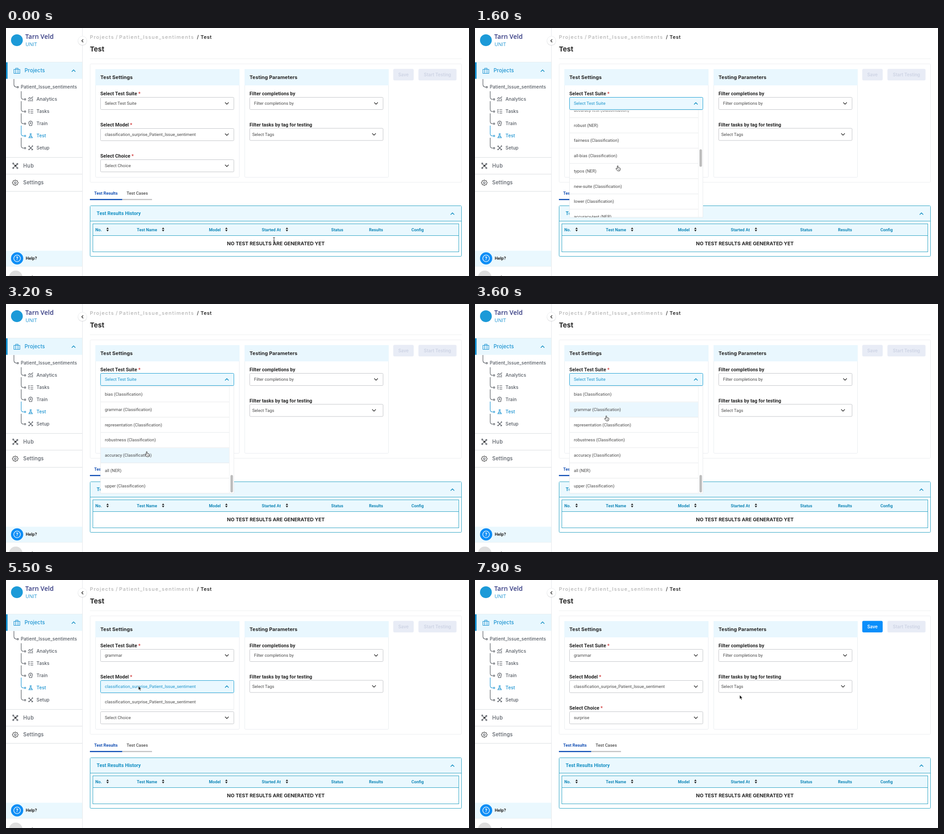
An HTML page for the animation above (8000 ms loop, 1021 px wide and 549 px high).

```html
<!DOCTYPE html>
<html lang="en">
<head>
<meta charset="utf-8">
<title>Test settings</title>
<style>
html, body { margin: 0; width: 100%; height: 100%; overflow: hidden; background: #fff; }
svg { display: block; width: 1021px; height: 549px; }
text { font-family: Roboto, sans-serif; font-size: 9.43px; fill: #4a4a4a; white-space: pre; }
.geo { font-family: Inter, sans-serif; font-weight: 500; fill: #555b63; }
.crumb { font-size: 11px; letter-spacing: 1.35px; fill: #b4b4b4; }
.nav { font-size: 11.1px; letter-spacing: .22px; }
.sub { font-size: 10.1px; letter-spacing: .08px; }
.head { font-size: 11px; font-weight: 700; letter-spacing: .08px; fill: #262626; }
.btn { font-size: 9.7px; font-weight: 600; text-anchor: middle; fill: #cdd3e4; }
.label { font-size: 10.7px; font-weight: 700; fill: #262626; }
.th { font-size: 9.2px; font-weight: 700; fill: #1488b8; }
.brand { font-family: "Open Sans", sans-serif; font-size: 14px; font-weight: 600; fill: #343a82; }
.line { fill: none; stroke: #4a4f57; stroke-width: 1.1; }
.blue { fill: #1490d0; }
.line.blue { fill: none; stroke: #1490d0; }
.chev { fill: none; stroke: #3c3c3c; stroke-width: 1.6; stroke-linecap: round; stroke-linejoin: round; }
.field rect { fill: #fff; stroke: #c3c5c9; }
.field.open rect { fill: #eaf8ff; stroke: #1d9fd2; }
.field.open text { fill: #1a94cc; }
.field.open .chev, .chev.blue { fill: none; stroke: #1490c4; }
.panel { fill: #fff; stroke: #e9ebed; }
.hover { fill: #eaf7fe; }
</style>
</head>
<body>
<svg id="stage" viewBox="0 0 1021 549"></svg>
<script>
const LOOP = 8000, STEP = 100, ROW = 33.75, TOP = 184;
const stage = document.getElementById('stage');

const text = (x, y, s, cls = '', extra = '') => `<text x="${x}" y="${y}" class="${cls}" ${extra}>${s}</text>`;
const rect = (x, y, w, h, fill, extra = '') =>
  `<rect x="${x}" y="${y}" width="${w}" height="${h}" fill="${fill}" ${extra}/>`;
const path = (d, cls = 'line', extra = '') => `<path d="${d}" class="${cls}" ${extra}/>`;
const rule = (x1, x2, y, color) => `<path d="M${x1} ${y}H${x2}" stroke="${color}"/>`;
const circle = (x, y, r, extra) => `<circle cx="${x}" cy="${y}" r="${r}" ${extra}/>`;
const chevron = (x, y, up) => `M${x - 3.5} ${y + (up ? 1.8 : -1.8)}l3.5 ${up ? -3.6 : 3.6} 3.5 ${up ? 3.6 : -3.6}`;
const label = (x, y, s, star) =>
  text(x, y, s + (star ? ' <tspan fill="#d23a3a">*</tspan>' : ''), 'label');
const field = (id, x, y, s, tx = x + 10, cx = x + 279) =>
  `<g class="field" id="${id}">` + rect(x + .5, y + .5, 294, 27, '', 'rx="2"') +
  text(tx, y + 17.2, s) + path(chevron(cx, y + 14), 'chev') + '</g>';

function sidebar() {
  const items = ['Analytics', 'Tasks', 'Train', 'Test', 'Setup'];
  const icons = [
    'M49.5 162.5V159M52.5 162.5V157M55.5 162.5V158.5M58.5 162.5V156M49 156.500l3-2.500 3 2 4.500-4',
    'M49 181l1.200 1.200 2-2.200M54 181H60M49 185l1.200 1.200 2-2.200M54 185H60M50 188.500h2M54 188.500H60',
    'M51.500 216V213.500A4.200 4.200 0 1 1 57 213.500V216ZM54.300 208.500v4M52.500 210.500h3.600',
    'M52.500 234h4M53.300 234v4l-3 5h8l-3-5v-4M51.600 240.800h5.500',
    'M50 261l9 9M59 261l-9 9M49.500 262.500l2.500-2M56.500 270.500l3-2.500M57.500 260l2 2M49.500 268l2 2'];
  let s = circle(24, 27, 13, 'fill="#1c9ad8"') +
    text(42.5, 24.3, 'Tarn Veld', 'brand') +
    text(43, 40, 'UNIT', 'brand', 'style="font-size:11px;font-weight:400;fill:#1c94d2"') +
    rule(0, 168, 75.5, '#e6edf1') +
    rect(0, 76, 168, 36.5, '#e8f7fe') + rect(0, 76, 3.5, 36.5, '#1490d0') +
    path('M17.5 91.500h13v9h-13zM21.500 100.500v-11.500h5v11.500', 'line blue') +
    text(41, 98.2, 'Projects', 'geo nav', 'style="fill:#1490d0"') +
    path(chevron(149, 94.5, true), 'chev blue') +
    path('M17.500 113V125Q17.500 130.500 24 131') + circle(26, 131, 1.6, 'class="line"') +
    text(32.5, 134.4, 'Patient_Issue_sentiments', 'geo sub');
  items.forEach((name, i) => {
    const y = 158 + 27 * i, on = name === 'Test' ? ' blue' : '';
    s += path(`M33.500 ${y - (i ? 23 : 18)}V${y - 5}Q33.500 ${y} 39.500 ${y}`, 'line' + on) +
      circle(42, y, 1.6, `class="line${on}"`) + path(icons[i], 'line' + on) +
      text(67.3, y + 3.4, name, 'geo sub', on && 'style="fill:#1490d0"');
  });
  for (const y of [286.5, 323.5, 361.5]) s += rule(0, 168, y, '#dadde0');
  s += path('M20.500 305l-4-4.500M20.500 305l4.500-4M20.500 305l-4.500 5M20.500 305l4 4.500M20.500 305h4');
  for (const [x, y] of [[16, 300], [25, 301], [16, 310], [25, 310]]) s += circle(x, y, 1.4, 'fill="#fff" class="line"');
  s += circle(20.5, 305, 2, 'fill="#333"') + text(38, 308.8, 'Hub', 'geo nav', 'style="letter-spacing:.6px"') +
    path('M20.500 336.500l2 1.500 2.500 0 .5 2.500 1.500 2-1.500 2-.5 2.500-2.500 0-2 1.500-2-1.500-2.500 0-.5-2.500-1.500-2 1.500-2 .5-2.500 2.500 0z', 'line', 'style="stroke:#333"') +
    circle(20.5, 342.5, 2, 'class="line"') + text(38, 346.3, 'Settings', 'geo nav') +
    rect(0, 493, 168, 34.5, '#eaf8fe') + rule(0, 168, 527.5, '#e6eff4') +
    circle(24.5, 510, 13.5, 'fill="#0d8ef6"') + circle(24.5, 510, 7.3, 'fill="none" stroke="#fff" stroke-width="1.3"') +
    text(24.5, 513.5, '?', '', 'text-anchor="middle" style="fill:#fff;font-weight:700;font-size:10px"') +
    text(43.5, 513.4, 'Help?', 'label', 'style="font-size:9.6px"') +
    circle(21.5, 552, 15, 'fill="#dedede"') + rect(57, 548, 2, 1, '#777') +
    path('M168.500 0V549', '', 'stroke="#e4e7ea"') +
    circle(168.5, 29, 10.2, 'fill="#000" opacity=".1"') + circle(168.5, 28, 9.8, 'fill="#fff" stroke="#e8eaec" stroke-width=".8"') +
    path('M169.800 25.500l-2.800 2.800 2.800 2.800', 'chev', 'stroke-width="1.2"');
  return s;
}

function card(x, title) {
  return rect(x + .5, 91.5, 317, 239, '#fff', 'rx="2" stroke="#e9edf0"') +
    rect(x, 91, 318, 36, '#e9f7fe') + text(x + 11, 112.7, title, 'geo head');
}

function main() {
  let s = text(185, 24, 'Projects', 'geo crumb') + text(242, 24, '/', 'geo crumb') +
    text(249.5, 24, 'Patient_Issue_sentiments', 'geo crumb') +
    text(421, 24, '/', 'geo crumb', 'style="fill:#262626"') +
    text(429, 24, 'Test', 'geo crumb', 'style="fill:#262626;font-weight:600;letter-spacing:.5px"') +
    text(185, 52, 'Test', 'geo head', 'style="font-size:15px;letter-spacing:0"') +
    rule(185, 1005, 68, '#eceeef') +
    rect(185.5, 79.5, 819, 262, '#fff', 'rx="2" stroke="#eceef0"') +
    card(197, 'Test Settings') + card(526, 'Testing Parameters') +
    label(208, 148.7, 'Select Test Suite', true) + label(208, 218, 'Select Model', true) +
    label(208, 287.4, 'Select Choice', true) +
    label(537, 148.7, 'Filter completions by') + label(537, 218, 'Filter tasks by tag for testing') +
    field('suite', 208, 153, 'Select Test Suite') +
    field('model', 208, 222, 'classification_surprise_Patient_Issue_sentiment') +
    field('choice', 208, 291, 'Select Choice') +
    field('filter', 537, 153, 'Filter completions by') +
    field('tags', 537, 221.5, 'Select Tags', 543, 811.5) +
    rect(854, 90.5, 45, 25.5, '#e8ecf6', 'rx="3" id="saveBox"') + text(876.5, 106.7, 'Save', 'geo btn', 'id="saveText"') +
    rect(909.5, 90.5, 84, 25.5, '#e8ecf6', 'rx="3"') + text(951.5, 106.7, 'Start Testing', 'geo btn') +
    text(194.5, 369, 'Test Results', '', 'style="fill:#1450b4;font-weight:700;font-size:9.25px"') +
    text(266, 369, 'Test Cases', '', 'style="font-weight:500"') +
    rect(185, 378.5, 71.5, 2.5, '#0d4cb4') + rect(256.5, 378.5, 65.5, 2.5, '#c2c2c4') +
    rect(185.5, 393.5, 819, 112, '#fff', 'rx="2" stroke="#2ba3c4"') +
    rect(186, 394, 818, 33.5, '#eaf8fe') + rule(186, 1004, 427.5, '#2ba3c4') +
    text(200, 414, 'Test Results History', 'label', 'style="fill:#1490c4"') + path(chevron(984.5, 411, true), 'chev blue') +
    rect(191.5, 433.5, 807, 62, '#fff', 'stroke="#2ba3c4"') +
    rect(192, 434, 806, 25.5, '#eaf8fe') + rule(192, 998, 459.5, '#2ba3c4') +
    text(595, 481.3, 'NO TEST RESULTS ARE GENERATED YET', 'geo head', 'text-anchor="middle" style="font-size:10.9px;letter-spacing:0"');
  const cols = [[197, 'No.', 224], [288.5, 'Test Name', 346.5], [447.5, 'Model', 486], [564, 'Started At', 619.5],
    [717, 'Status'], [800.5, 'Results'], [894, 'Config']];
  for (const [x, name, sort] of cols) {
    s += text(x, 449.8, name, 'th');
    if (sort) s += path(`M${sort - 2.6} 445h5.200l-2.600-3.600zM${sort - 2.6} 446.800h5.200l-2.600 3.600z`, '', 'fill="#222"');
  }
  return s;
}

function suiteNames() {
  const first = ['Create New Test Suite', 'all-classification-stomach (Classification)', 'all-class-withplant (Classification)',
    'all-with-plant (NER)', 'Test (NER)', 'Upper (NER)', 'TestSuite (Classification)'];
  const last = ['bias', 'grammar', 'representation', 'robustness', 'accuracy', 'all (NER)', 'upper'];
  const mid = ['lower', 'accuracy-test', 'robust', 'fairness', 'all-bias', 'typos', 'new-suite'];
  const kind = (s, i) => s + (i % 3 ? ' (Classification)' : ' (NER)');
  return [...first, ...Array.from({ length: 29 }, (_, i) => kind(mid[i % 7], i)),
    ...last.map(s => s.includes('(') ? s : s + ' (Classification)')];
}

const names = suiteNames(), maxScroll = (names.length - 7) * ROW + .7;

function panels() {
  const rows = names.map((n, i) => text(i ? 218 : 236.5, 203.8 + i * ROW, n) + rule(209, 492, 217.5 + i * ROW, '#e7e9eb')).join('');
  const small = (id, y, s) => `<g id="${id}List">` + rect(208.5, y, 294, 35, '', 'class="panel"') +
    rect(209, y + 1, 293, 33, '', 'class="hover"') + text(218, y + 21, s) + '</g>';
  return '<clipPath id="view"><rect x="208" y="183" width="285" height="236"/></clipPath>' +
    '<g id="suiteList">' + rect(208.5, 181.5, 294, 237.5, '', 'class="panel"') +
    rect(209, TOP, 283, 33, '', 'class="hover"') +
    '<g clip-path="url(#view)"><g id="rows">' + path('M220.800 200.500h7.400M224.500 196.800v7.400', 'line', 'style="stroke:#333"') + rows + '</g></g>' +
    path('M492.500 182V419', '', 'stroke="#eef0f2"') +
    rect(495, 185, 5.5, 38.5, '#bdbdbd', 'rx="2.700" id="thumb"') + '</g>' +
    small('model', 251.5, 'classification_surprise_Patient_Issue_sentiment') + small('choice', 320.5, 'surprise');
}

const pointers =
  '<g id="beam"><path d="M-2-5.500Q0-5.500 0-4V4Q0 5.500-2 5.500M2-5.500Q0-5.500 0-4M0 4Q0 5.500 2 5.500M-1.300 1.800H1.300" fill="none" stroke="#222"/></g>' +
  '<g id="hand"><path d="M-1 1a1 1 0 0 1 2 0v3.200l3.600.7q1.400.3 1.300 1.700l-.5 2.600-1 2.100h-4.600l-1.600-2-2-2.300q-.5-1 .5-1.400.8-.2 2.300 1.400z" fill="#fff" stroke="#222" stroke-width=".95" stroke-linejoin="round"/><path d="M1.500 7v2.500M3.200 7v2.500" stroke="#222" stroke-width=".6"/></g>' +
  '<g id="arrow"><path d="M0 0V9.200L2.100 7.300 3.600 10.700 5.300 10 3.800 6.700H6.600Z" fill="#111" stroke="#fff" stroke-width=".8"/></g>';

stage.innerHTML = main() + sidebar() + panels() + `<g id="pointer">${pointers}</g>`;

// time, x, y of the pointer's hot spot
const moves = [
  [0, 591, 469], [900, 591, 469], [1000, 575, 440], [1100, 370, 195], [1200, 311, 170], [1300, 312.5, 214.5],
  [1400, 313, 222], [1700, 315.5, 346.5], [3100, 315.5, 346.5], [3600, 289.5, 247.5], [5200, 289.5, 247.5],
  [5400, 292, 234.5], [5800, 292, 234.5], [6000, 291, 266], [6100, 291, 266], [6400, 283.5, 311.5],
  [6700, 283.5, 311.5], [6900, 270, 336], [7100, 270, 336], [7600, 505, 264], [7700, 589, 257], [7900, 583.5, 254.5]];
const lists = {
  suite: { from: 1200, to: 4500, y: 183, h: 236, cy: 167 },
  model: { from: 5400, to: 6100, y: 252, h: 34, cy: 236 },
  choice: { from: 6500, to: 7100, y: 321, h: 34, cy: 305 }
};
const get = id => document.getElementById(id);
const show = (el, on) => el.setAttribute('visibility', on ? 'inherit' : 'hidden');
const put = (el, x, y) => el.setAttribute('transform', `translate(${x} ${y})`);

function pointerAt(t) {
  const i = moves.findIndex(m => m[0] > t);
  if (i < 0) return moves[moves.length - 1].slice(1);
  const [t0, x0, y0] = moves[i - 1], [t1, x1, y1] = moves[i], k = (t - t0) / (t1 - t0);
  return [x0 + (x1 - x0) * k, y0 + (y1 - y0) * k];
}

function render(t) {
  const [x, y] = pointerAt(t);
  let shape = t < 1000 ? 'beam' : 'arrow';
  for (const id in lists) {
    const l = lists[id], open = t >= l.from && t < l.to, over = open && y > l.y && y < l.y + l.h;
    if (over) shape = 'hand';
    get(id).classList.toggle('open', open);
    get(id).querySelector('.chev').setAttribute('d', chevron(487, l.cy, open));
    const list = get(id + 'List'), hover = list.querySelector('.hover');
    show(list, open);
    show(hover, over && !(id === 'suite' && t >= 1400 && t < 2300));
    if (!open) show(hover, false);
    if (id === 'suite') hover.setAttribute('y', TOP + Math.floor((y - TOP) / ROW) * ROW);
  }
  const k = Math.min(1, Math.max(0, (t - 1350) / 550)), ease = k * k * (3 - 2 * k);
  put(get('rows'), 0, -maxScroll * ease);
  put(get('thumb'), 0, 193.5 * ease);
  get('suite').querySelector('text').textContent = t < lists.suite.to ? 'Select Test Suite' : 'grammar';
  const done = t >= lists.choice.to;
  get('choice').querySelector('text').textContent = done ? 'surprise' : 'Select Choice';
  get('saveBox').setAttribute('fill', done ? '#0a8ffb' : '#e8ecf6');
  get('saveText').style.fill = done ? '#fff' : '';
  for (const id of ['beam', 'hand', 'arrow']) show(get(id), id === shape);
  put(get('pointer'), x, y);
}

const start = performance.now();
function tick() {
  const t = (performance.now() - start) % LOOP;
  render(Math.floor(t / STEP) * STEP);
  requestAnimationFrame(tick);
}
tick();
</script>
</body>
</html>
```
